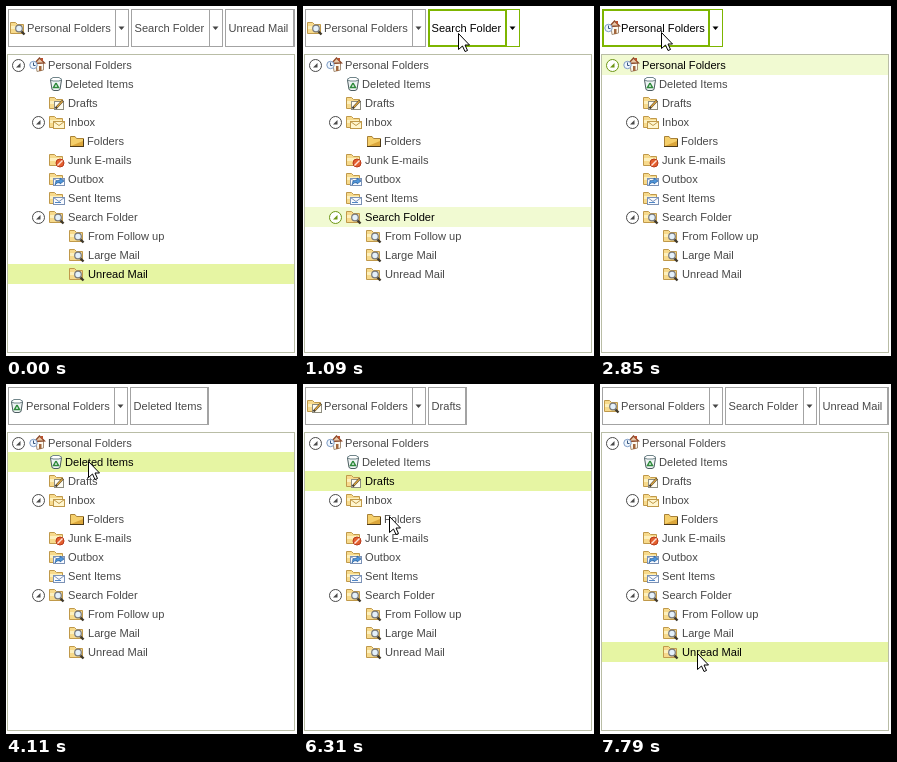
Write an HTML page with a canvas that moves like this. It is 291 by 350 pixels and loops after 8000 ms.

```html
<!DOCTYPE html>
<html lang="en">
<head>
<meta charset="utf-8">
<title>Breadcrumb and folder tree</title>
<style>
  html, body { margin: 0; height: 100%; overflow: hidden; background: #fff; }
  canvas { display: block; }
</style>
</head>
<body>
<canvas id="stage" width="291" height="350"></canvas>
<script>
const ctx = document.getElementById('stage').getContext('2d');
const LOOP = 8000, ROW = 19;
const GREEN = '#7db500', GRAY = '#a3a3a3', TEXT = '#484848';

// label, icon, icon x, text x, parent, crumb width, has children
const nodes = [
  ['Personal Folders', 'home', 23, 42, -1, 108, true],
  ['Deleted Items', 'bin', 42, 59, 0, 79],
  ['Drafts', 'draft', 43, 62, 0, 39],
  ['Inbox', 'mail', 43, 62, 0, 37, true],
  ['Folders', 'folder', 63, 81, 3, 47],
  ['Junk E-mails', 'junk', 43, 62, 0, 71],
  ['Outbox', 'outbox', 43, 62, 0, 44],
  ['Sent Items', 'sent', 43, 62, 0, 59],
  ['Search Folder', 'search', 43, 62, 0, 79, true],
  ['From Follow up', 'search', 63, 82, 8, 85],
  ['Large Mail', 'search', 63, 82, 8, 60],
  ['Unread Mail', 'search', 63, 82, 8, 70],
].map(([label, icon, iconX, textX, parent, width, open]) =>
  ({ label, icon, iconX, textX, parent, width, open }));

// Each step changes only the fields it names.
const start = { selected: 11, soft: false, crumb: -1, arrow: false, row: -1, tint: true, at: null };
const steps = [
  [300, { at: [253, 83] }],
  [420, { at: [205, 52] }],
  [540, { at: [155, 27], crumb: 1 }],
  [970, { selected: 8, soft: true }],
  [1800, { at: [112, 27], crumb: 0, arrow: true }],
  [1950, { at: [61, 26], arrow: false }],
  [2850, { selected: 0 }],
  [3280, { at: [72, 54], crumb: -1 }],
  [3400, { at: [78, 81], row: 1 }],
  [3830, { at: [82, 77] }],
  [4110, { selected: 1, soft: false }],
  [4700, { at: [81, 82] }],
  [4820, { at: [78, 91], row: 2 }],
  [4940, { at: [74, 97] }],
  [5190, { selected: 2 }],
  [6310, { at: [86, 132], row: -1 }],
  [6430, { at: [104, 184] }],
  [6550, { at: [117, 215], row: 8 }],
  [6830, { selected: 8 }],
  [7390, { at: [97, 268], row: 11, tint: false }],
  [7540, { at: [97, 269] }],
  [7790, { selected: 11 }],
];

function poly(points, fill, stroke, width = 1) {
  ctx.beginPath();
  for (let i = 0; i < points.length; i += 2) ctx.lineTo(points[i], points[i + 1]);
  if (fill) { ctx.closePath(); ctx.fillStyle = fill; ctx.fill(); }
  if (stroke) { ctx.strokeStyle = stroke; ctx.lineWidth = width; ctx.stroke(); }
}

function disc(x, y, r, fill, stroke, width = 1) {
  ctx.beginPath();
  ctx.arc(x, y, r, 0, 7);
  ctx.fillStyle = fill;
  ctx.fill();
  ctx.strokeStyle = stroke;
  ctx.lineWidth = width;
  ctx.stroke();
}

function box(x, y, w, h, fill) {
  ctx.fillStyle = fill;
  ctx.fillRect(x, y, w, h);
}

function frame(x, y, w, h, color, line = 1) {
  ctx.strokeStyle = color;
  ctx.lineWidth = line;
  ctx.strokeRect(x + line / 2, y + line / 2, w - line, h - line);
}

function text(label, x, y, color) {
  ctx.font = '11.1px "Liberation Sans", Arial, sans-serif';
  ctx.fillStyle = color;
  ctx.fillText(label, x, y);
}

function folder() {
  poly([.5, 2.5, 5.5, 2.5, 7.5, 4.5, 13.5, 4.5, 13.5, 13.5, .5, 13.5], '#f7da8c', '#c0994a');
  box(1, 6, 12, 3, '#fdf0bd');
}

function envelope(fill, line) {
  box(4, 7, 12, 8, fill);
  frame(4, 7, 12, 8, line);
  poly([4.5, 7.5, 10, 11.5, 15.5, 7.5], null, line);
}

const icons = {
  folder() {
    poly([1.5, 3.5, 6, 3.5, 7.5, 5.5, 14.5, 5.5, 14.5, 13.5, 1.5, 13.5], '#f5cf6b', '#a98238');
    poly([2, 13, 14, 13, 14, 8], '#dba63b');
    box(1, 13, 14, 1, '#4d3a18');
    box(14, 6, 1, 8, '#4d3a18');
  },
  home() {
    poly([7, 7, 14.5, 5.5, 14.5, 13, 8, 14.5], '#fdf8ee', '#a58f78');
    poly([5.5, 6.5, 10.5, 1, 15.5, 6], '#e9c9a9', '#8c4a2b', 1.3);
    box(12, 1, 2, 3, '#b9502e');
    box(10, 9, 2.5, 5, '#a2673d');
    disc(4.5, 8, 3.7, '#eff6fd', '#7e9bc4');
    poly([4.5, 5.5, 4.5, 8.5, 6.5, 8.5], null, '#34557f');
  },
  bin() {
    poly([2.5, 4, 13.5, 4, 12, 13.5, 10, 14.5, 6, 14.5, 4, 13.5], '#eef4f4', '#4c5c60');
    poly([2, 3.5, 5, 1.5, 11, 1.5, 14, 3.5, 11, 5, 5, 5], '#fff', '#71858a');
    poly([8, 7, 10.5, 11.5, 5.5, 11.5, 8, 7], null, '#2f8a3c', 1.5);
  },
  draft() {
    folder();
    box(5, 6, 10, 9, '#fffdf2');
    frame(5, 6, 10, 9, '#8c8c80');
    poly([6.5, 13.5, 14, 5.5], null, '#4b4030', 2.4);
    poly([8, 12, 13.5, 6], null, '#e2a93e', 1.2);
  },
  mail() {
    folder();
    envelope('#fff6cf', '#c0994a');
  },
  junk() {
    folder();
    disc(11, 11, 4, '#e4602f', '#b8391b');
    poly([8.5, 13.5, 13.5, 8.5], null, '#ffe2d8', 1.4);
  },
  outbox() {
    folder();
    envelope('#f9fbff', '#7b91b5');
    poly([6, 14, 7, 10, 11, 9, 11, 7, 15, 10, 11, 13, 11, 11.5, 8, 12], '#4f96db', '#27609e', .7);
  },
  sent() {
    folder();
    envelope('#f9fbff', '#7b91b5');
    box(6, 12, 6, 1, '#4f86c6');
  },
  search() {
    folder();
    poly([10.5, 10.5, 14.5, 14.5], null, '#3f382c', 2.4);
    disc(9, 8.5, 3.3, '#e4f1fb', '#77787b', 1.2);
  },
};

function icon(name, x, y) {
  ctx.save();
  ctx.translate(x, y);
  icons[name]();
  ctx.restore();
}

function drawCrumbs(s) {
  const path = [];
  for (let id = s.selected; id >= 0; id = nodes[id].parent) path.unshift(nodes[id]);
  const badge = nodes[s.selected].icon;
  const slim = badge === 'bin' ? 1 : 0; // the bin is one pixel narrower than the other icons
  let x = 2;
  path.forEach((node, i) => {
    const hot = i === s.crumb, color = hot ? GREEN : GRAY;
    const w = node.width - (i ? 0 : slim), full = w + (node.open ? 13 : 0);
    frame(x, 3, full, 38, color);
    box(x + w - (node.open ? 1 : 2), 3, 1, 38, color);
    if (node.open) poly([x + w + 2.5, 20.5, x + w + 8.5, 20.5, x + w + 5.5, 24], hot ? '#000' : '#444');
    if (hot) frame(s.arrow ? x + w - 1 : x, 3, s.arrow ? 14 : w, 38, GREEN, 2);
    if (!i) icon(badge, x + 2 - slim, 14);
    text(node.label, x + (i ? 3.5 : 19 - slim), 26, hot ? '#000' : TEXT);
    x += full + 2;
  });
}

function drawTree(s) {
  frame(1, 48, 288, 299, '#b9bda6');
  nodes.forEach((node, i) => {
    const mid = 59 + i * ROW, picked = i === s.selected, hot = i === s.row;
    const strong = picked && !s.soft;
    if (picked || hot && s.tint) box(2, mid - 10, 286, ROW + 1, strong ? '#e6f5a3' : '#f1fad2');
    if (node.open) {
      const x = node.iconX - 10.5, y = mid + .5;
      const color = hot || picked && s.soft ? '#6d9615' : '#4a4a4a';
      disc(x, y, 6, '#fff', color);
      poly([x + 2, y - 2.5, x + 2, y + 2, x - 2.5, y + 2], color);
    }
    icon(node.icon, node.iconX, mid - 8);
    text(node.label, node.textX, mid + 4, picked || hot ? '#000' : TEXT);
  });
}

function drawCursor([x, y]) {
  ctx.save();
  ctx.translate(x + .5, y + .5);
  poly([0, 0, 0, 16, 4, 12.5, 6.5, 18, 9, 17, 6.5, 11.5, 11, 11.5], '#fff', '#000');
  ctx.restore();
}

function render(now) {
  const time = now % LOOP, state = { ...start };
  for (const [at, change] of steps) if (time >= at) Object.assign(state, change);
  box(0, 0, 291, 350, '#fff');
  drawCrumbs(state);
  drawTree(state);
  if (state.at) drawCursor(state.at);
  requestAnimationFrame(render);
}
requestAnimationFrame(render);
</script>
</body>
</html>
```
